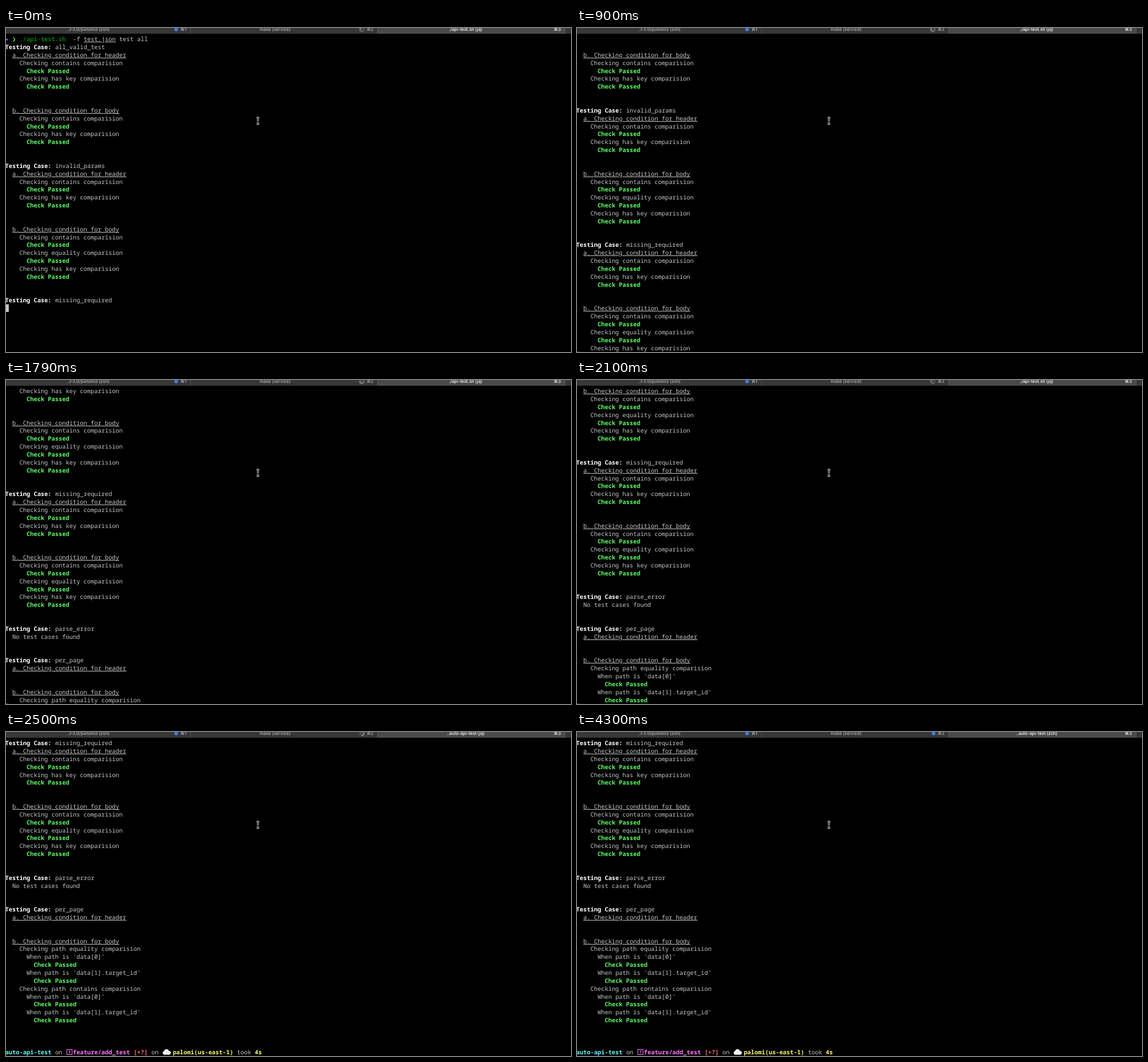
An HTML page with a canvas for the animation above (4580 ms loop, 988 by 567 pixels).

```html
<!DOCTYPE html>
<html lang="en">
<head>
<meta charset="utf-8">
<title>Terminal test run</title>
<style>
html, body { margin: 0; width: 100%; height: 100%; overflow: hidden; background: #000; }
canvas { display: block; width: 988px; height: 567px; }
</style>
</head>
<body>
<canvas id="stage" width="988" height="567"></canvas>
<script>
const ctx = document.getElementById('stage').getContext('2d');
const LOOP = 4580;
const CELL = 6.235, PITCH = 13.86, LEFT = -1.4, BASE = 23.1, ROWS = 40;
const PROMPT_LINE = 72;
const GREY = '#c7c7c7', GREEN = '#5ffa68', YELLOW = '#fefb67';

// Each tick: start time and the line the terminal cursor has reached
const TICKS = [
  [0, 34], [150, 35], [300, 36], [450, 38], [600, 43], [750, 45], [900, 47],
  [1040, 51], [1190, 51], [1340, 55], [1490, 55], [1640, 55], [1790, 60],
  [1940, 62], [2100, 64], [2350, 67], [2500, 73]
];
for (let t = 2650; t <= 4300; t += 150) TICKS.push([t, 73]);

const seg = (text, col, color = GREY, bold = false, underline = false) =>
  ({ text, col, color, bold, underline });

function buildLines() {
  const lines = [];
  const add = (...segs) => lines.push(segs);
  const blank = n => { while (n--) add(); };
  const title = name => add(seg('Testing Case:', 0, '#fff', true), seg(name, 14));
  const heading = text => add(seg(text, 2, GREY, false, true));
  const passed = col => add(seg('Check Passed', col, GREEN, true));
  const check = kind => add(seg(`Checking ${kind} comparision`, 4));
  const section = (head, kinds) => {
    heading(head);
    for (const kind of kinds) { check(kind); passed(6); }
    blank(2);
  };
  const HEADER = 'a. Checking condition for header';
  const BODY = 'b. Checking condition for body';
  const short = ['contains', 'has key'];
  const full = ['contains', 'equality', 'has key'];

  add(seg('✦', 0, '#6871ff', true), seg('❯', 2, GREEN, true),
    seg('./api-test.sh', 4, '#00c200'), seg('-f', 19),
    seg('test.json', 22, GREY, false, true), seg('test all', 32));
  const cases = [['all_valid_test', short], ['invalid_params', full], ['missing_required', full]];
  for (const [name, body] of cases) {
    title(name);
    section(HEADER, short);
    section(BODY, body);
  }
  title('parse_error');
  add(seg('No test cases found', 2));
  blank(2);
  title('per_page');
  section(HEADER, []);
  heading(BODY);
  for (const kind of ['path equality', 'path contains']) {
    check(kind);
    for (const path of ['data[0]', 'data[1].target_id']) {
      add(seg(`When path is '${path}'`, 6));
      passed(8);
    }
  }
  blank(3);
  add(seg('auto-api-test', 0, '#60fdff', true), seg('on', 14),
    seg('feature/add_test', 19, '#ff77ff', true), seg('[+?]', 36, '#ff6e67', true),
    seg('on', 41), seg('palomi(us-east-1)', 47, YELLOW, true),
    seg('took', 65), seg('4s', 70, YELLOW, true));
  return lines;
}
const LINES = buildLines();

function rect(x, y, w, h, color) {
  ctx.fillStyle = color;
  ctx.fillRect(x, y, w, h);
}

function disc(x, y, r, color) {
  ctx.fillStyle = color;
  ctx.beginPath();
  ctx.arc(x, y, r, 0, Math.PI * 2);
  ctx.fill();
}

function drawSegment(s, baseline) {
  const x = LEFT + s.col * CELL;
  ctx.font = `${s.bold ? 700 : 500} 10.39px "Noto Sans Mono", "DejaVu Sans Mono", monospace`;
  ctx.fillStyle = s.color;
  ctx.fillText(s.text, x, baseline);
  if (!s.underline) return;
  // The rule breaks around descenders
  for (const run of s.text.matchAll(/[^gj]+/g)) {
    ctx.fillRect(x + run.index * CELL, Math.round(baseline + 1), run[0].length * CELL, 1);
  }
}

function drawPromptIcons(baseline) {
  const y = baseline - 3.5;
  ctx.strokeStyle = '#ff77ff';
  ctx.lineWidth = 1;
  ctx.strokeRect(106.5, Math.round(y) - 4.5, 9, 9);
  ctx.font = '700 8px "Noto Sans Mono", monospace';
  ctx.fillStyle = '#ff77ff';
  ctx.textAlign = 'center';
  ctx.fillText('?', 111, y + 3);
  ctx.textAlign = 'left';
  disc(277.3, y + 1.4, 3.2, '#f2f2f2');
  disc(280.6, y - 1.2, 4, '#f2f2f2');
  disc(284.8, y + 1.2, 3.4, '#f2f2f2');
  rect(277, y + 1, 8, 3.6, '#f2f2f2');
}

function drawTerminal(cursor) {
  const scroll = Math.max(0, cursor - ROWS);
  ctx.textAlign = 'left';
  for (let i = scroll; i < Math.min(cursor, LINES.length); i++) {
    const baseline = BASE + (i - scroll) * PITCH;
    for (const s of LINES[i]) drawSegment(s, baseline);
    if (i === PROMPT_LINE) drawPromptIcons(baseline);
  }
  if (cursor <= PROMPT_LINE) {
    rect(LEFT, 12.3 + (cursor - scroll) * PITCH, CELL, 13.4, GREY);
  }
}

function drawSpinner(x, y, t) {
  const lead = Math.floor(t / 1000 * 12);
  ctx.lineWidth = 1;
  ctx.lineCap = 'round';
  for (let i = 0; i < 12; i++) {
    const a = i * Math.PI / 6;
    const age = ((lead - i) % 12 + 12) % 12;
    ctx.strokeStyle = `rgba(225,225,225,${0.85 - age * 0.06})`;
    ctx.beginPath();
    ctx.moveTo(x + Math.sin(a) * 2.4, y - Math.cos(a) * 2.4);
    ctx.lineTo(x + Math.sin(a) * 4.7, y - Math.cos(a) * 4.7);
    ctx.stroke();
  }
  ctx.lineCap = 'butt';
}

function drawTabs(t) {
  rect(0, 0, 988, 10, '#373739');
  rect(650, 0, 327, 10, '#4a4a4c');
  for (const x of [322, 649, 977]) rect(x, 0, 1, 10, '#555557');
  const active = t < 2500 ? './api-test.sh (jq)'
    : t < 2650 ? '..auto-api-test (jq)' : '..auto-api-test (zsh)';
  const tabs = [
    ['..F3.0/pulseviz (zsh)', 144, '⌘1', 310, '#b4b4b4'],
    ['make (service)', 470.5, '⌘2', 636.5, '#b4b4b4'],
    [active, 803.7, '⌘3', 964, '#fff']
  ];
  ctx.textAlign = 'center';
  for (const [label, x, key, keyX, color] of tabs) {
    ctx.font = '500 7.6px Inter, "DejaVu Sans", sans-serif';
    ctx.fillStyle = color;
    ctx.fillText(label, x, 5.2);
    ctx.fillText(key, keyX, 5.2);
  }
  disc(297.5, 2.5, 3.2, '#4479f0');
  if (t < 4300) drawSpinner(622.5, 2.5, t);
  else disc(623.5, 2.5, 3.2, '#4479f0');
}

function drawPointer(x, y) {
  const path = new Path2D();
  for (const d of [-1, 1]) {
    path.moveTo(x - 2.5, y + d * 5.5);
    path.quadraticCurveTo(x, y + d * 5.5, x, y + d * 3.5);
    path.quadraticCurveTo(x, y + d * 5.5, x + 2.5, y + d * 5.5);
  }
  path.moveTo(x, y - 4);
  path.lineTo(x, y + 4);
  path.moveTo(x - 1.5, y + 1.5);
  path.lineTo(x + 1.5, y + 1.5);
  ctx.strokeStyle = '#d8d8d8';
  ctx.lineWidth = 2.8;
  ctx.stroke(path);
  ctx.strokeStyle = '#000';
  ctx.lineWidth = 1;
  ctx.stroke(path);
}

function draw(now) {
  const t = now % LOOP;
  const [start, cursor] = TICKS.findLast(tick => tick[0] <= t);
  ctx.textRendering = 'geometricPrecision';
  rect(0, 0, 988, 567, '#000');
  drawTerminal(cursor);
  drawTabs(start);
  drawPointer(440.5, 162.5);
}

const origin = performance.now();
function loop() {
  draw(performance.now() - origin);
  requestAnimationFrame(loop);
}
loop();
</script>
</body>
</html>
```
